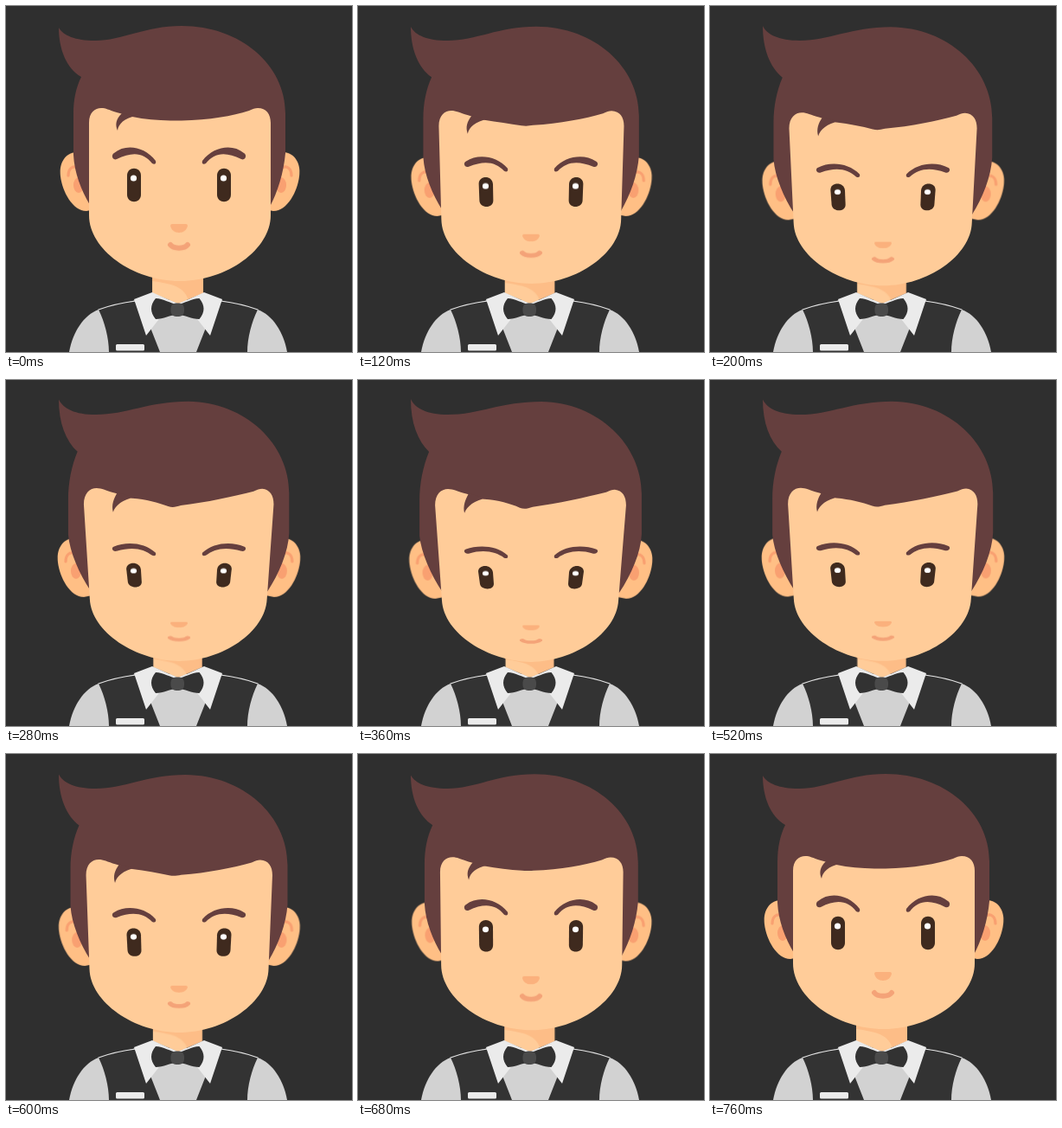
An HTML page without scripts that plays this animation: 400x400 px, repeating every 0.8 s.

```html
<!DOCTYPE html>
<html lang="en">
<head>
<meta charset="utf-8">
<title>Nodding waiter</title>
<style>
  html, body { margin: 0; width: 100%; height: 100%; overflow: hidden; background: #2f2f2f; }
  svg { display: block; width: 100%; height: 100%; }

  /* Outlines morph from --up to --down; rigid parts move by --shift. */
  .morph { d: var(--up); animation: morph 800ms infinite; }
  .shift { animation: shift 800ms infinite; transform-box: fill-box; transform-origin: center; }
  @keyframes morph {
    0% { d: var(--up); animation-timing-function: cubic-bezier(.3, .25, .6, 1); }
    50% { d: var(--down); }
    55% { d: var(--down); animation-timing-function: cubic-bezier(.333, 0, .667, 1); }
    95%, 100% { d: var(--up); }
  }
  @keyframes shift {
    0% { transform: none; animation-timing-function: cubic-bezier(.3, .25, .6, 1); }
    50% { transform: var(--shift); }
    55% { transform: var(--shift); animation-timing-function: cubic-bezier(.333, 0, .667, 1); }
    95%, 100% { transform: none; }
  }

  .skin { fill: #ffcc99; }
  .hair { fill: #653f3e; }
  .collar { fill: #ebebeb; }
  .vest { fill: #333; }
  .line { fill: none; stroke-linecap: round; }

  #hair {
    --up: path("M61,25 C66,34 80,40 103,40 C135,40 160,23 203,23 C271,23 323,68 323,124 L323,170 C321,193 314,215 305,232 L97,230 C87,213 79,193 78,172 L78,125 C78,108 81,94 87,82 C70,72 61,50 61,25 Z");
    --down: path("M61,22 C66,33 80,40 104,40 C140,40 165,25 212,25 C278,26 328,75 328,132 L328,178 C327,200 316,225 302,246 L98,246 C84,225 73,200 71,180 L71,140 C71,120 75,100 82,83 C69,70 61,50 61,22 Z");
  }
  #face {
    --up: path("M96,135 C96,123 103,118 110,118 C116,118 118,120 128,123 C134,125 140,126 146,128 C160,131 175,132 190,132.5 C195,132.600 198,132.600 203,132.500 C235,132 262,127 281,121 C285,119 288,118 291,118 C301,118 306,125 306,135 L306,242 C306,281 256,318 201,318 C146,318 96,281 96,242 Z");
    --down: path("M89,145 C89,132 96,126 104,126 C110,126 115,129 126,132 C132,134 140,136 146,138 C162,139 176,143 187,148 C192,150 196,149 202,147 C231,143 263,136 287,130 C291,128 294,127 297,127 C306,128 310,135 310,145 L301,255 C299,293 249,326 200,326 C151,326 99,293 97,255 Z");
  }
  #strand {
    --up: path("M134,124 C127,131 126,137 129,144 C130,136 137,130 150,127 Z");
    --down: path("M128,131 C124,138 121,146 123,154 C126,146 135,139 148,137 Z");
  }
  .brow {
    --up: path("M125,170 C138,159 160,162 173,179 C174,182 172,184 169,182 C159,169 146,168 128,177 C123,179 121,172 125,170 Z");
    --down: path("M125,196 C138,191 160,191 173,203 C174,206 172,207 169,206 C159,199 146,196 128,201 C123,202 121,197 125,196 Z");
  }
  .eye {
    --up: path("M140,196 C140,185 156,185 156,196 L156,218 C156,229 140,229 140,218 Z");
    --down: path("M139,222 C139,213 155,213 156,223 L157,236 C157,244 142,243 141,236 Z");
    fill: #3f2a1e;
  }

  .glint { fill: #fff; --shift: translate(0, 25px) scale(1, .75); }
  #nose { fill: #fbb17d; --shift: translate(0, 30px) scale(1, .6); }
  #mouth { stroke: #f4a378; stroke-width: 6; --shift: translate(0, 24.5px) scale(1, .57); }
  #neck { --shift: scale(.96, 1); }
  #chin-shadow { fill: #fdbd87; --shift: translate(0, 5px); }
  #left-ear { --shift: translate(-3.5px, 16px); }
  #right-ear { --shift: translate(1px, 16px); }
</style>
</head>
<body>
<svg viewBox="0 0 400 400">
  <defs>
    <g id="ear">
      <path fill="#ffbf85" d="M82,169 C69,169 61,181 63,197 C65,214 77,237 93,237 L103,235 V185 Z"/>
      <path class="line" stroke="#f9a071" stroke-width="3.2" d="M72,196 C72,188 77,184 83,187"/>
      <ellipse cx="84" cy="207" rx="6" ry="9" fill="#f9a071"/>
    </g>
    <g id="half-suit">
      <path class="vest" d="M107,351 Q126,344 149,341 L167,372 L178,400 H119 C119,384 114,365 107,351 Z"/>
      <path class="line" stroke="#e4e4e4" stroke-width="1.2" d="M107,351 Q126,344 150,341"/>
      <path class="collar" d="M148,339 L169,331 L198,344 V352 L180,358 L162,381 Z"/>
    </g>
    <path id="wing" fill="#323232" d="M198,345 C190,344 182,338 173,338 Q163,350 173,362 C182,362 190,357 198,357 Z"/>
    <clipPath id="neck-shape"><path d="M169,300 H228 V332 L199,344 L169,332 Z"/></clipPath>
  </defs>

  <path fill="#d2d2d2" d="M73,400 C77,377 90,357 107,351 L150,340 H247 L291,351 C308,357 321,377 325,400 Z"/>
  <g id="neck" class="shift">
    <g clip-path="url(#neck-shape)">
      <path class="skin" d="M169,300 H228 V344 H169 Z"/>
      <path id="chin-shadow" class="shift" d="M169,318 C190,321 208,323 212,344 H228 V300 H169 Z"/>
    </g>
  </g>
  <use href="#half-suit"/>
  <use href="#half-suit" transform="translate(398) scale(-1 1)"/>
  <rect class="collar" x="127" y="391" width="33" height="7.5" rx="1.5"/>
  <use href="#wing"/>
  <use href="#wing" transform="translate(396.5) scale(-1 1)"/>
  <rect x="190.5" y="343.5" width="15.5" height="15.5" rx="6" fill="#4a4a4a"/>

  <g id="left-ear" class="shift"><use href="#ear"/></g>
  <g id="right-ear" class="shift"><use href="#ear" transform="translate(402) scale(-1 1)"/></g>
  <path id="hair" class="morph hair"/>
  <path id="face" class="morph skin"/>
  <path id="strand" class="morph hair"/>

  <path class="morph hair brow"/>
  <path class="morph eye"/>
  <g transform="translate(400) scale(-1 1)">
    <path class="morph hair brow"/>
    <path class="morph eye"/>
  </g>
  <circle class="shift glint" cx="147.5" cy="199" r="3.6"/>
  <circle class="shift glint" cx="251.5" cy="199" r="3.6"/>
  <path id="nose" class="shift" d="M192,252 H208 Q210,252 210,254 C209,259 205,262 200,262 C195,262 191,259 190,254 Q190,252 192,252 Z"/>
  <path id="mouth" class="shift line" d="M190,276 C194,281 206,281 210,276"/>
</svg>
</body>
</html>
```
